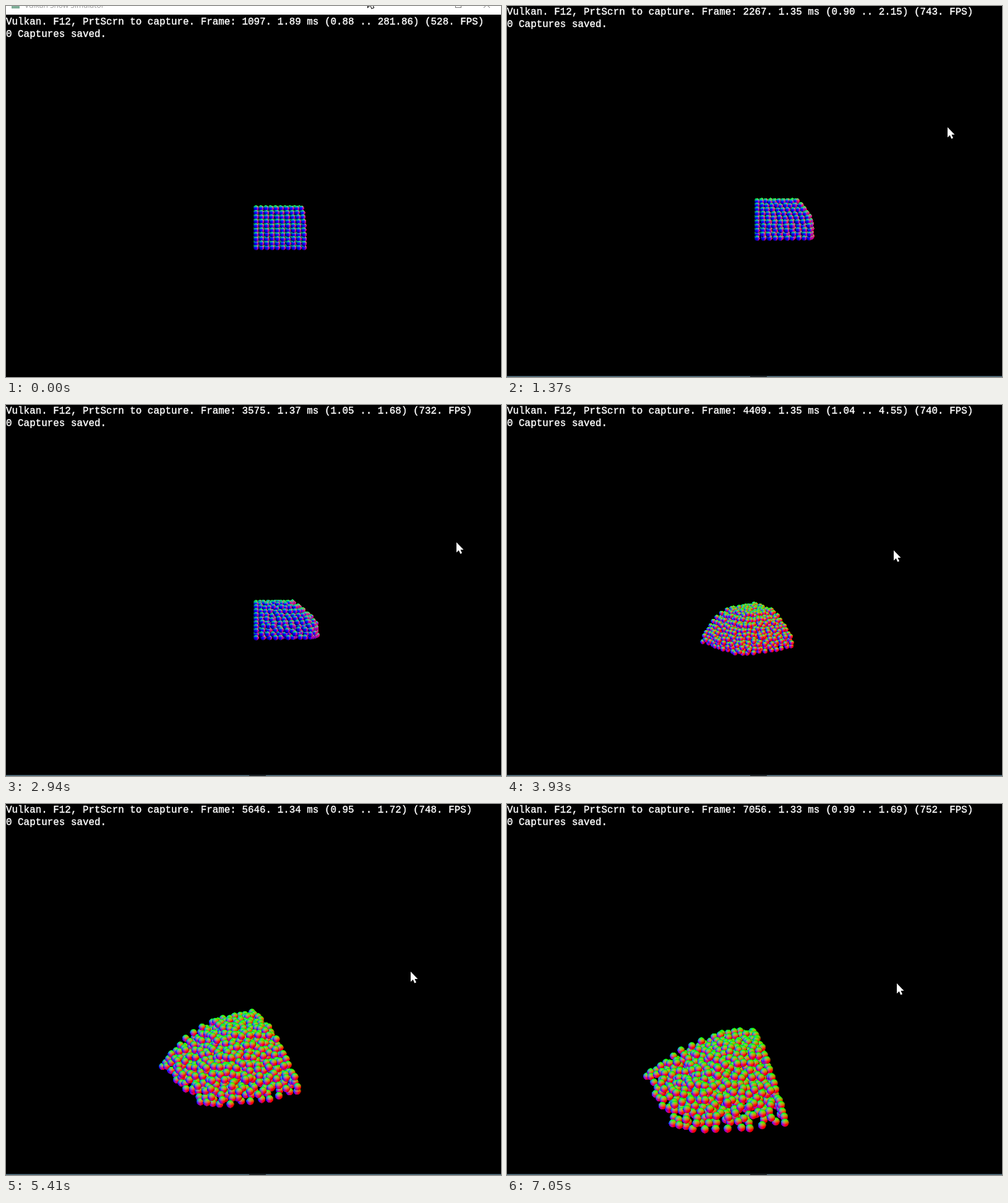
Write an HTML page with a canvas that moves like this. It is 800x600 px and loops after 7150 ms.

```html
<!DOCTYPE html>
<html lang="en">
<head>
<meta charset="utf-8">
<title>Vulkan Snow Simulator</title>
<style>
html, body { margin: 0; width: 100%; height: 100%; overflow: hidden; background: #000; }
canvas { display: block; }
</style>
</head>
<body>
<canvas id="stage" width="800" height="600"></canvas>
<script>
const LOOP = 7150, END = 7050, FLOOR = -73, RADIUS = 4.2, FOCAL = 1200, POSES = 7;
const g = document.getElementById('stage').getContext('2d');

// time, counter, pointer x and y, yaw in degrees, pitch, distance, pan
const keys = [
  [0, 1097, 585, -15, 0, 0, 1250, 0],
  [760, 1746, 592, -17, 0, 0, 1250, 0],
  [1370, 2267, 712, 196, 0, 0, 1250, 0],
  [2940, 3575, 728, 222, 0, 0, 1250, 0],
  [3930, 4409, 625, 235, 54, .25, 1320, 0],
  [5410, 5646, 654, 271, 64, .45, 890, 0],
  [6240, 6350, 544, 281, 118, .31, 840, 0],
  [7050, 7056, 630, 290, 74, .5, 840, 22]
];
// rate with shortest and longest frame time, renewed about once a second
const timings = [
  [528, .88, 281.86], [743, .9, 2.15], [737, 1.02, 2.07], [732, 1.05, 1.68],
  [740, 1.04, 4.55], [748, .95, 1.72], [747, 1.05, 1.71], [752, .99, 1.69]
];

const smooth = u => u * u * (3 - 2 * u);
const clamp01 = u => Math.max(0, Math.min(1, u));
const mix = (a, b, u) => a + (b - a) * u;

function sample(t) {
  let n = 0;
  while (n < keys.length - 2 && t >= keys[n + 1][0]) n++;
  const from = keys[n], to = keys[n + 1], u = (t - from[0]) / (to[0] - from[0]);
  const [x, y, yaw, pitch, distance, pan] =
    from.slice(2).map((v, c) => mix(v, to[c + 2], smooth(u)));
  return { frame: Math.floor(mix(from[1], to[1], u)), x, y, yaw, pitch, distance, pan };
}

let seed = 7;
function random() {
  seed = (seed * 16807) % 2147483647;
  return seed / 2147483647 - .5;
}

const grains = [];
for (let n = 0; n < 1000; n++) {
  const cell = [n % 10, Math.floor(n / 10) % 10, Math.floor(n / 100)];
  // Grains on the walls and the floor stay there.
  grains.push({ at: cell.map(c => c / 9), jitter: cell.map(c => c ? random() : 0) });
}

// Push overlapping grains apart, keeping them inside the corner.
function relax(points, gap, rounds) {
  while (rounds--) {
    for (let a = 0; a < points.length; a++) {
      const p = points[a];
      for (let b = 0; b < a; b++) {
        const q = points[b], dx = p[0] - q[0];
        if (dx > gap || dx < -gap) continue;
        const dy = p[1] - q[1], dz = p[2] - q[2], d = Math.hypot(dx, dy, dz);
        if (d >= gap || d === 0) continue;
        const m = (gap - d) / d * .4;
        p[0] += dx * m; p[1] += dy * m * .4; p[2] += dz * m;
        q[0] -= dx * m; q[1] -= dy * m * .4; q[2] -= dz * m;
      }
    }
    for (const p of points) [4, FLOOR, 4].forEach((low, c) => p[c] = Math.max(low, p[c]));
  }
  return points;
}

// The block slumps into a rounded mound as s goes from 0 to 1.
function slump(s) {
  const base = 80 + 44 * s ** .7, top = 76 - 30 * s, height = -11 - 26 * s;
  const bulge = 3.2 - 1.5 * s, round = .14 * clamp01(3 * s), loose = .8 + 6 * s;
  const points = grains.map(({ at: [i, j, k], jitter }) => {
    const reach = mix(base, top, j ** bulge) - 4;
    return [
      4 + i * reach * (1 - round * k * k),
      mix(FLOOR, height, j),
      4 + k * reach * (1 - round * i * i)
    ].map((v, c) => v + jitter[c] * loose);
  });
  return relax(points, 7, s ? 8 : 0);
}
const poses = Array.from({ length: POSES }, (_, n) => slump(n / (POSES - 1)));

const SIZE = 24;
const ball = document.createElement('canvas');
ball.width = ball.height = SIZE;
const ballCtx = ball.getContext('2d');
const pixels = ballCtx.createImageData(SIZE, SIZE);

// One sphere coloured by its world-space normal.
function paintBall(right, up, toward) {
  for (let y = 0, o = 0; y < SIZE; y++)
    for (let x = 0; x < SIZE; x++, o += 4) {
      const u = (x + .5) * 2 / SIZE - 1, v = 1 - (y + .5) * 2 / SIZE, r = u * u + v * v;
      const w = Math.sqrt(Math.max(0, 1 - r));
      for (let c = 0; c < 3; c++)
        pixels.data[o + c] = 255 * (right[c] * u + up[c] * v + toward[c] * w);
      pixels.data[o + 3] = r < 1 ? 255 : 0;
    }
  ballCtx.putImageData(pixels, 0, 0);
}

function drawSnow(t, { yaw, pitch, distance, pan }, drop) {
  const a = yaw * Math.PI / 180;
  const ca = Math.cos(a), sa = Math.sin(a), cp = Math.cos(pitch), sp = Math.sin(pitch);
  paintBall([ca, 0, -sa], [-sa * sp, cp, -ca * sp], [sa * cp, sp, ca * cp]);

  const phase = t / END * (POSES - 1), n = Math.min(POSES - 2, Math.floor(phase));
  const spots = poses[n].map((p, m) => {
    const [x, y, z] = p.map((v, c) => mix(v, poses[n + 1][m][c], phase - n));
    const d = x * sa + z * ca, depth = d * cp + y * sp, scale = FOCAL / (distance - depth);
    return {
      depth, r: RADIUS * scale,
      x: 400 + (x * ca - z * sa) * scale,
      y: 300 + pan + drop - (y * cp - d * sp) * scale
    };
  });
  spots.sort((p, q) => p.depth - q.depth);
  for (const { x, y, r } of spots) g.drawImage(ball, x - r, y - r, 2 * r, 2 * r);
}

function drawWindow(drop) {
  g.fillStyle = '#5b7a8a';
  g.fillRect(0, 598.5 + drop, 800, 2);
  g.fillStyle = '#1c2226';
  g.fillRect(393, 598.5 + drop, 27, 2);

  g.fillStyle = '#fff';
  g.fillRect(0, -34 + drop, 800, 32);
  g.fillStyle = '#7fae98';
  g.fillRect(9, -25 + drop, 13, 13);
  g.fillStyle = '#999';
  g.font = '12px "Open Sans", sans-serif';
  g.fillText('Vulkan Snow Simulator', 30, -13 + drop);
  g.strokeStyle = '#777';
  g.lineWidth = 1;
  g.strokeRect(726.5, -22.5 + drop, 9, 9);
  g.beginPath();
  g.moveTo(772, -23 + drop); g.lineTo(782, -13 + drop);
  g.moveTo(782, -23 + drop); g.lineTo(772, -13 + drop);
  g.stroke();
}

function drawText(t, frame, drop) {
  const [rate, low, high] = timings[Math.floor(clamp01((t + 185) / 7720) * 8)];
  const [mean, min, max] = [1000 / rate, low, high].map(v => v.toFixed(2));
  const lines = [
    `Vulkan. F12, PrtScrn to capture. Frame: ${frame}. ${mean} ms (${min} .. ${max}) (${rate}. FPS)`,
    '0 Captures saved.'
  ];
  g.fillStyle = g.strokeStyle = '#fff';
  g.lineWidth = .4;
  g.font = '15.9px "Liberation Mono", monospace';
  lines.forEach((line, n) => {
    g.fillText(line, 0, 14 + 20 * n + drop);
    g.strokeText(line, 0, 14 + 20 * n + drop);
  });
}

const arrow = new Path2D('M0 0V16.5L3.8 13L6.3 18.8L9 17.6L6.5 12H11.5Z');
function drawPointer({ x, y }) {
  g.save();
  g.translate(x, y);
  g.fillStyle = '#fff';
  g.strokeStyle = '#000';
  g.lineWidth = 2;
  g.stroke(arrow);
  g.fill(arrow);
  g.restore();
}

function draw() {
  const t = Math.min(performance.now() % LOOP, END), view = sample(t);
  const drop = 16 * (1 - smooth(clamp01((t - 60) / 440)));
  g.fillStyle = '#000';
  g.fillRect(0, 0, 800, 600);
  drawSnow(t, view, drop);
  drawWindow(drop);
  drawText(t, view.frame, drop);
  drawPointer(view);
  requestAnimationFrame(draw);
}
draw();
</script>
</body>
</html>
```
